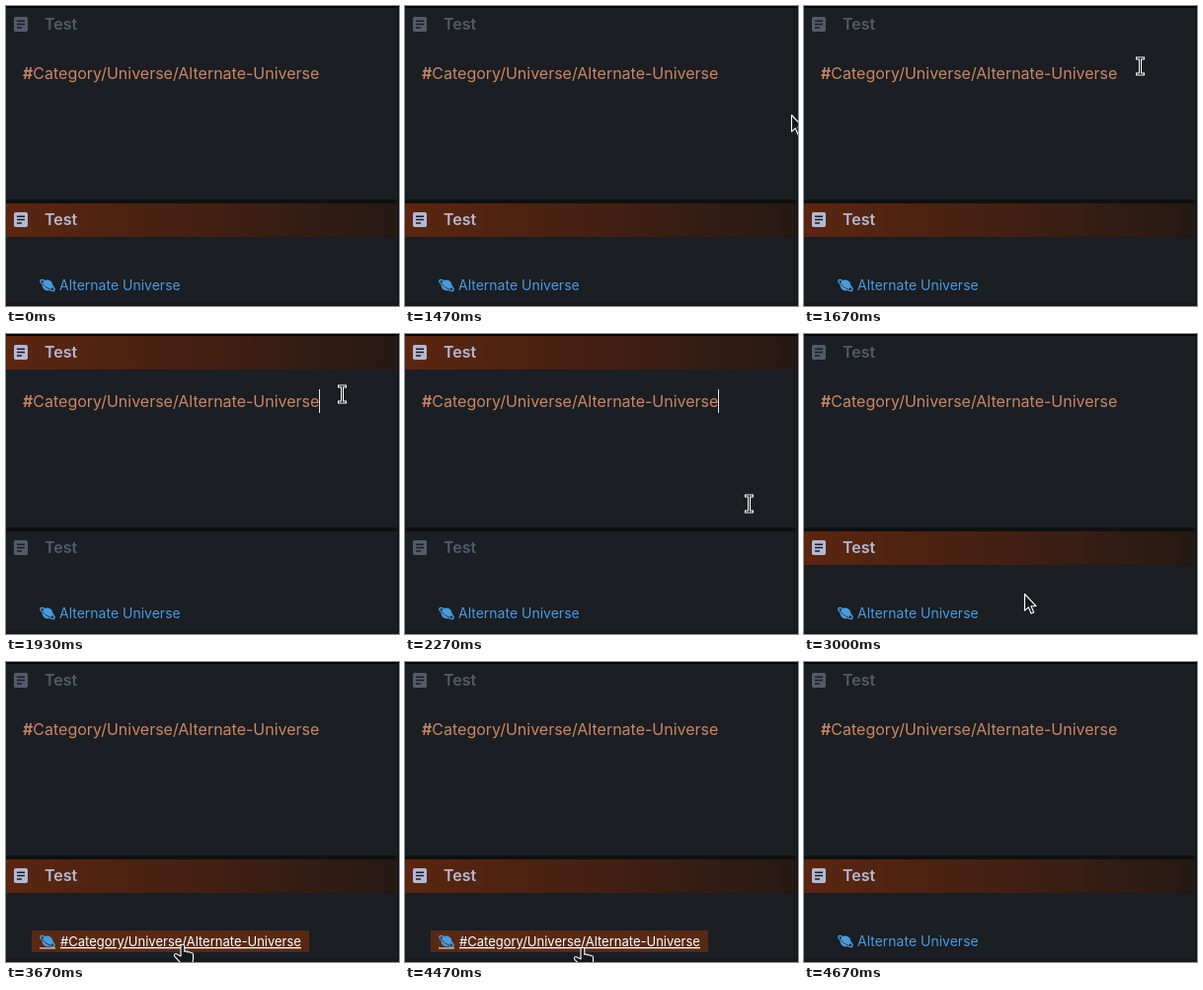
Write an HTML page that moves like this. It is 398 px wide and 304 px high and loops after 6140 ms.

```html
<!DOCTYPE html>
<html lang="en">
<head>
<meta charset="utf-8">
<title>Tag link</title>
<style>
  html, body { margin: 0; width: 100%; height: 100%; overflow: hidden; background: #1b1e23; }
  svg { display: block; font-family: Inter, sans-serif; }
  .head { fill: #535a69; }
  .head .bar { fill: none; }
  .head.active { fill: #b4b8d2; }
  .head.active .bar { fill: url(#glow); }
  .head text { font-size: 16px; font-weight: 600; }
  .lines { fill: none; stroke: #1b1e23; stroke-width: 1.5; }
  .active .lines { stroke: #4f2414; }
  .pointer { fill: #16181c; stroke: #fff; stroke-width: 1.1; stroke-linejoin: round; }
</style>
</head>
<body>
<svg width="398" height="304" viewBox="0 0 398 304">
  <defs>
    <linearGradient id="glow">
      <stop offset="0" stop-color="#5b2611"/>
      <stop offset=".5" stop-color="#432012"/>
      <stop offset="1" stop-color="#261913"/>
    </linearGradient>
    <g id="page">
      <rect x="8" y="9" width="14" height="15" rx="1.8"/>
      <path class="lines" d="M11 13.3h8M11 16.6h8M11 19.9h5"/>
    </g>
  </defs>
  <rect width="398" height="304" fill="#1b1e23"/>
  <rect width="398" height="2" fill="#050607"/>
  <rect y="196" width="398" height="4" fill="#0e1013"/>
  <rect y="300" width="398" height="4" fill="#17191f"/>
  <rect x="396" y="2" width="2" height="298" fill="#17191d"/>

  <g id="top" class="head" transform="translate(0 2)">
    <rect class="bar" width="396" height="34"/>
    <use href="#page"/>
    <text x="39" y="22">Test</text>
  </g>
  <g id="bottom" class="head" transform="translate(0 200)">
    <rect class="bar" width="396" height="34"/>
    <use href="#page"/>
    <text x="39" y="22">Test</text>
  </g>

  <text x="17" y="74" font-size="16" fill="#cd8661"><tspan font-weight="600">#</tspan>Category/Universe/Alternate-Universe</text>
  <rect id="caret" x="317" y="56" width="1" height="24" fill="#e4e4e8"/>

  <rect id="chip" x="26" y="272" width="281" height="22" fill="#572914"/>
  <g fill="#4a9bdc">
    <circle cx="42" cy="283" r="5.4"/>
    <ellipse cx="42" cy="283" rx="8.6" ry="2.6" transform="rotate(36 42 283)" fill="none" stroke="#4a9bdc" stroke-width="1.3"/>
    <path d="M36 280.5q4 5.5 11 7.5" fill="none" stroke="#1b2a3a" stroke-width=".8"/>
  </g>
  <text id="label" x="54" y="288" font-size="14" fill="#4a9bdc">Alternate Universe</text>
  <g id="hover" fill="#fff">
    <text x="55" y="288" font-size="13" text-decoration="underline">#Category/Universe/Alternate-Universe</text>
    <rect x="34" y="289.5" width="16" height="1"/>
  </g>

  <g id="cursor">
    <path id="arrow" class="pointer" d="M.5 .5V17.3L4.3 13.8 7 20.2 9.7 19 7 12.7H12Z"/>
    <g id="beam" fill="none" stroke-linecap="square">
      <path stroke="#fff" stroke-width="3" d="M-3-8H3M-3 8H3M0-8V8"/>
      <path stroke="#16181c" d="M-3-8H3M-3 8H3M0-8V8"/>
    </g>
    <path id="hand" class="pointer" d="M-2 12V2.2a1.9 1.9 0 0 1 3.8 0V7.5q1.9-1.2 3.2.6 2-1 3.1.7 2.2-.6 2.4 1.7V15q0 3-1.8 5V22H-1V20L-8 12.6q-1.4-2 .5-2.8 1.5-.3 3 1Z"/>
  </g>
</svg>
<script>
const LOOP = 6140;
// time, x, y, shape; each pose holds until the next
const poses = [
  [0, 0, 0, ''],
  [1470, 391, 110, 'arrow'], [1530, 371, 87, 'beam'], [1600, 350, 68, 'beam'], [1670, 340.5, 61, 'beam'],
  [2070, 341.5, 66, 'beam'], [2130, 343.5, 96, 'beam'], [2200, 346.5, 142, 'beam'], [2270, 348.5, 172, 'beam'],
  [2470, 344.5, 179, 'beam'], [2530, 317, 205, 'arrow'], [2600, 268, 238, 'arrow'],
  [2670, 234, 259, 'arrow'], [2730, 223, 263, 'arrow'],
  [3270, 216, 265, 'arrow'], [3330, 197, 271, 'arrow'], [3400, 184, 281, 'hand'],
  [3470, 180, 286, 'hand'], [3670, 179, 286, 'hand'],
  [4470, 180, 289, 'hand'], [4530, 181, 293, 'hand'], [4600, 183, 299, 'arrow'], [4670, 0, 0, '']
];
const el = id => document.getElementById(id);
const show = (id, on) => el(id).setAttribute('visibility', on ? 'visible' : 'hidden');

function draw(now) {
  const t = now % LOOP;
  const [, x, y, shape] = poses.findLast(p => p[0] <= t);
  const editing = t >= 1930 && t < 3000;
  const hovered = shape === 'hand';

  el('top').classList.toggle('active', editing);
  el('bottom').classList.toggle('active', !editing);
  show('caret', t >= 1930 && t < 2470);
  show('chip', hovered);
  show('hover', hovered);
  show('label', !hovered);
  el('cursor').setAttribute('transform', `translate(${x} ${y})`);
  for (const s of ['arrow', 'beam', 'hand']) show(s, s === shape);
}

const start = performance.now();
function tick() {
  draw(performance.now() - start);
  requestAnimationFrame(tick);
}
tick();
</script>
</body>
</html>
```
